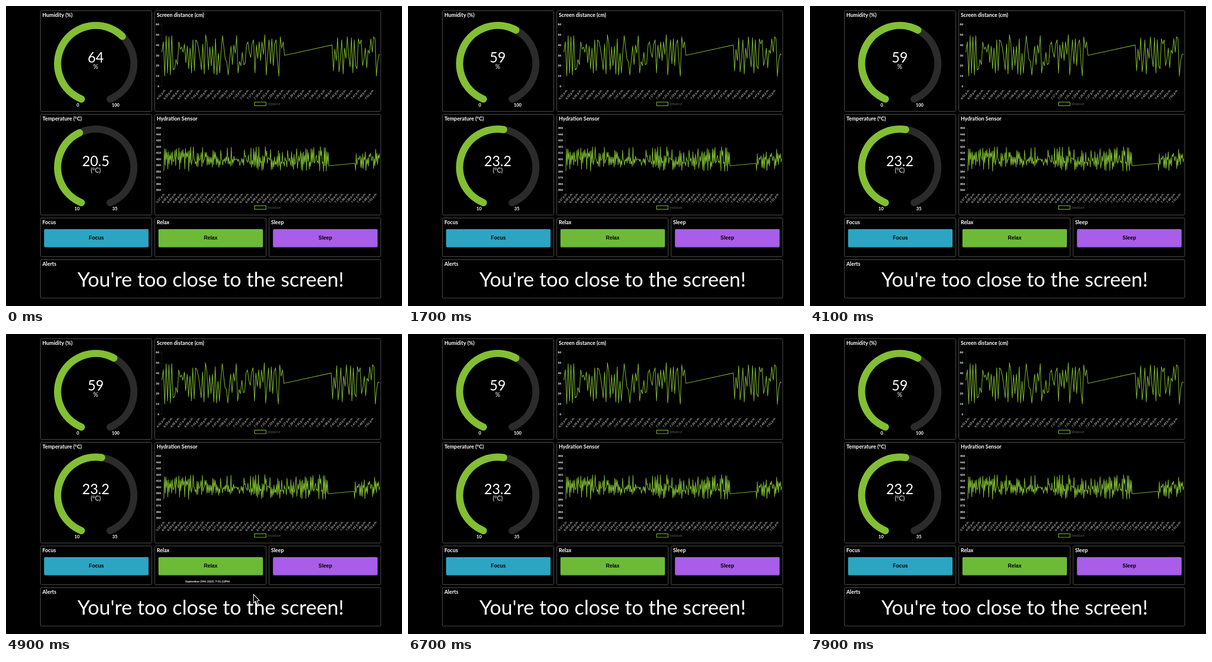
Recreate the animation shown at these times as an HTML page with a canvas. Size 800x605 px, loop 8 s.

```html
<!DOCTYPE html>
<html lang="en">
<head>
<meta charset="utf-8">
<title>Desk dashboard</title>
<style>
html, body { margin: 0; width: 100%; height: 100%; overflow: hidden; background: #000; }
canvas { display: block; }
</style>
</head>
<body>
<canvas id="stage" width="800" height="605"></canvas>
<script>
const ctx = document.getElementById('stage').getContext('2d');
const LOOP = 8000;
const GREEN = '#82bf32';
const SANS = 'Lato, sans-serif';
const ARIAL = '"Liberation Sans", Arial, sans-serif';

// Screen distance readings before and after the pause
const EARLY = [33, 43, 10, 49, 13, 48, 11, 49, 16, 17, 26, 21, 43, 36, 38, 33, 41, 23, 39, 17,
  37, 13, 45, 15, 45, 43, 37, 28, 16, 41, 12, 50, 42, 16, 38, 20, 39, 12, 46, 11, 32, 13, 34,
  49, 37, 26, 24, 11, 25, 39, 21, 40, 32, 49, 13, 24, 20, 33, 21, 22, 40, 43, 33, 28, 41, 45,
  13, 40, 27, 43, 25, 43, 31, 50, 11, 30, 45, 22, 46, 20, 41, 45, 24, 10, 48, 37, 43, 30];
const LATE = [40, 15, 36, 25, 47, 14, 26, 45, 12, 37, 27, 48, 30, 19, 47, 13, 45, 20, 17, 46,
  41, 45, 20, 26, 37, 18, 35, 32, 46, 33, 48, 46, 10, 25, 31, 31];

const spread = (values, x0, x1) =>
  values.map((v, i) => [x0 + (x1 - x0) * i / (values.length - 1), v]);

function noise(seed, count) {
  return Array.from({ length: count }, (_, i) => {
    seed = (seed * 16807) % 2147483647;
    const r = seed / 2147483647;
    const high = i % 2 ? 0.35 : 0;
    return 380 + 40 * (high + r * 0.65);
  });
}

const distance = [...spread(EARLY, 315, 561.5), ...spread(LATE, 657, 754.5)];
const moisture = [...spread([...noise(4127, 252), 389], 319, 650.5),
  ...spread([393, ...noise(8861, 40)], 703, 755)];

function text(str, x, y, size, { weight = 400, color = '#fff', align = 'left', family = SANS } = {}) {
  ctx.font = `${weight} ${size}px ${family}`;
  ctx.fillStyle = color;
  ctx.textAlign = align;
  ctx.fillText(str, x, y);
}

function panel(title, x, y, w, h) {
  ctx.strokeStyle = '#585858';
  ctx.lineWidth = 1;
  ctx.beginPath();
  ctx.roundRect(x + 0.5, y + 0.5, w, h, 2);
  ctx.stroke();
  text(title, x + 4.5, y + 13, 10.6, { weight: 700 });
}

function arc(cx, cy, part, color) {
  const half = 22.2 * Math.PI / 180;
  const start = Math.PI / 2 + half;
  ctx.strokeStyle = color;
  ctx.lineWidth = 14.5;
  ctx.lineCap = 'round';
  ctx.beginPath();
  ctx.arc(cx, cy, 77, start, start + part * (2 * Math.PI - 2 * half));
  ctx.stroke();
  ctx.lineCap = 'butt';
}

function gauge(cy, value, label, unit, min, max) {
  const cx = 181.3;
  arc(cx, cy, 1, '#2b2b2b');
  arc(cx, cy, (value - min) / (max - min), GREEN);
  text(label, cx, cy - 2, 28, { align: 'center' });
  text(unit, cx, cy + 11, 12.5, { align: 'center' });
  const edge = { align: 'center', weight: 700 };
  text(min, min ? 143.5 : 145, cy + 86.5, 9, edge);
  text(max, max === 100 ? 221.5 : 220, cy + 86.5, 9, edge);
}

function clock(minutes) {
  const h = Math.floor(minutes / 60);
  return `${h}:${String(minutes % 60).padStart(2, '0')} p.m.`;
}

function chart({ points, left, top, lo, hi, step, start, every, count, gap, labelX, name, stretch }) {
  const height = 125;
  const toY = v => top + height * (hi - v) / (hi - lo);

  ctx.fillStyle = '#1c1c1c';
  ctx.fillRect(left - 0.5, top, 1, height);
  for (let v = lo; v <= hi; v += step) {
    ctx.fillStyle = '#1c1c1c';
    ctx.fillRect(left - 4, Math.round(toY(v)), 4, 1);
    const wide = hi > 100;
    text(v, wide ? 313 : 309.5, toY(v) + 2.1, 6, { align: 'right', family: ARIAL, weight: 700 });
  }

  for (let i = 0; i < count; i++) {
    ctx.save();
    ctx.translate(labelX + i * gap, top + height + 6.5);
    ctx.rotate(-50 * Math.PI / 180);
    text(clock(start + i * every), 0, 2, 6, { align: 'right', family: ARIAL });
    ctx.restore();
  }

  ctx.save();
  ctx.beginPath();
  ctx.rect(left - 1, top, 756 - left, height);
  ctx.clip();
  ctx.strokeStyle = GREEN;
  ctx.lineWidth = 1.15;
  ctx.lineJoin = 'round';
  ctx.beginPath();
  for (const [x, v] of points) ctx.lineTo(left + (x - left) * stretch, toY(v));
  ctx.stroke();
  ctx.restore();

  ctx.strokeStyle = GREEN;
  ctx.lineWidth = 1.2;
  ctx.strokeRect(502.3, top + 156.8, 23, 7.2);
  text(name, 528, top + 163, 7, { color: '#585858', family: ARIAL });
}

function button(label, x, color, shade) {
  ctx.fillStyle = shade;
  ctx.beginPath();
  ctx.roundRect(x, 451, 211, 36, 2);
  ctx.fill();
  ctx.fillStyle = color;
  ctx.beginPath();
  ctx.roundRect(x, 450, 211, 35.5, 2);
  ctx.fill();
  text(label, x + 105.5, 471.3, 10.3, { weight: 700, color: '#000', align: 'center', family: ARIAL });
}

function pointer(x, y) {
  const shape = [[0, 0], [0, 17.5], [4, 14], [7.2, 21.2], [10, 20], [7, 13], [12, 12.6]];
  ctx.beginPath();
  for (const [dx, dy] of shape) ctx.lineTo(x + dx, y + dy);
  ctx.closePath();
  ctx.fillStyle = '#000';
  ctx.fill();
  ctx.strokeStyle = '#fff';
  ctx.lineWidth = 1.2;
  ctx.lineJoin = 'round';
  ctx.stroke();
}

const progress = (t, from, to) => Math.min(1, Math.max(0, (t - from) / (to - from)));
const easeOut = p => 1 - (1 - p) ** 3;
const mix = (a, b, p) => a + (b - a) * p;

function draw(t) {
  ctx.fillStyle = '#000';
  ctx.fillRect(0, 0, 800, 605);

  panel('Humidity (%)', 69, 9, 225, 203);
  panel('Screen distance (cm)', 300, 9, 456.5, 203);
  panel('Temperature (°C)', 69, 218, 225, 203);
  panel('Hydration Sensor', 300, 218, 456.5, 203);
  panel('Focus', 69, 427, 225, 78);
  panel('Relax', 300, 427, 225, 78);
  panel('Sleep', 531, 427, 225.5, 78);
  panel('Alerts', 69, 511, 687.5, 77.5);

  const fresh = t >= 950;
  const shift = easeOut(progress(t, 950, 1650));
  gauge(116.3, mix(64, 59, shift), fresh ? '59' : '64', '%', 0, 100);
  gauge(325.3, mix(20.5, 23.2, shift), fresh ? '23.2' : '20.5', '(°C)', 10, 35);

  const stretch = t >= 900 ? 1 : 1.005;
  chart({ points: distance, left: 315, top: 37, lo: 0, hi: 60, step: 10, start: 411, every: 2,
    count: 31, gap: 14.02, labelX: 321.5, name: 'distance', stretch });
  chart({ points: moisture, left: 318.5, top: 246, lo: 350, hi: 450, step: 10, start: 357, every: 3,
    count: 39, gap: 11.26, labelX: 320.5, name: 'moisture', stretch });

  button('Focus', 77, '#2ba5c2', '#1c7c94');
  button('Relax', 308, '#6dba38', '#4b8826');
  button('Sleep', 539.5, '#a85ee8', '#7d40b2');

  if (t >= 4600 && t < 5900) {
    text('September 29th 2025, 7:51:22PM', 407, 501.3, 5.9, { weight: 700, align: 'center' });
  }
  text("You're too close to the screen!", 413.5, 565.5, 40.7, { align: 'center' });

  if (t >= 4300 && t < 5300) {
    const p = easeOut(progress(t, 4300, 4800));
    pointer(mix(505, 500, p), mix(537, 525, p));
  }
}

function frame() {
  draw(performance.now() % LOOP);
  requestAnimationFrame(frame);
}
frame();
</script>
</body>
</html>
```
